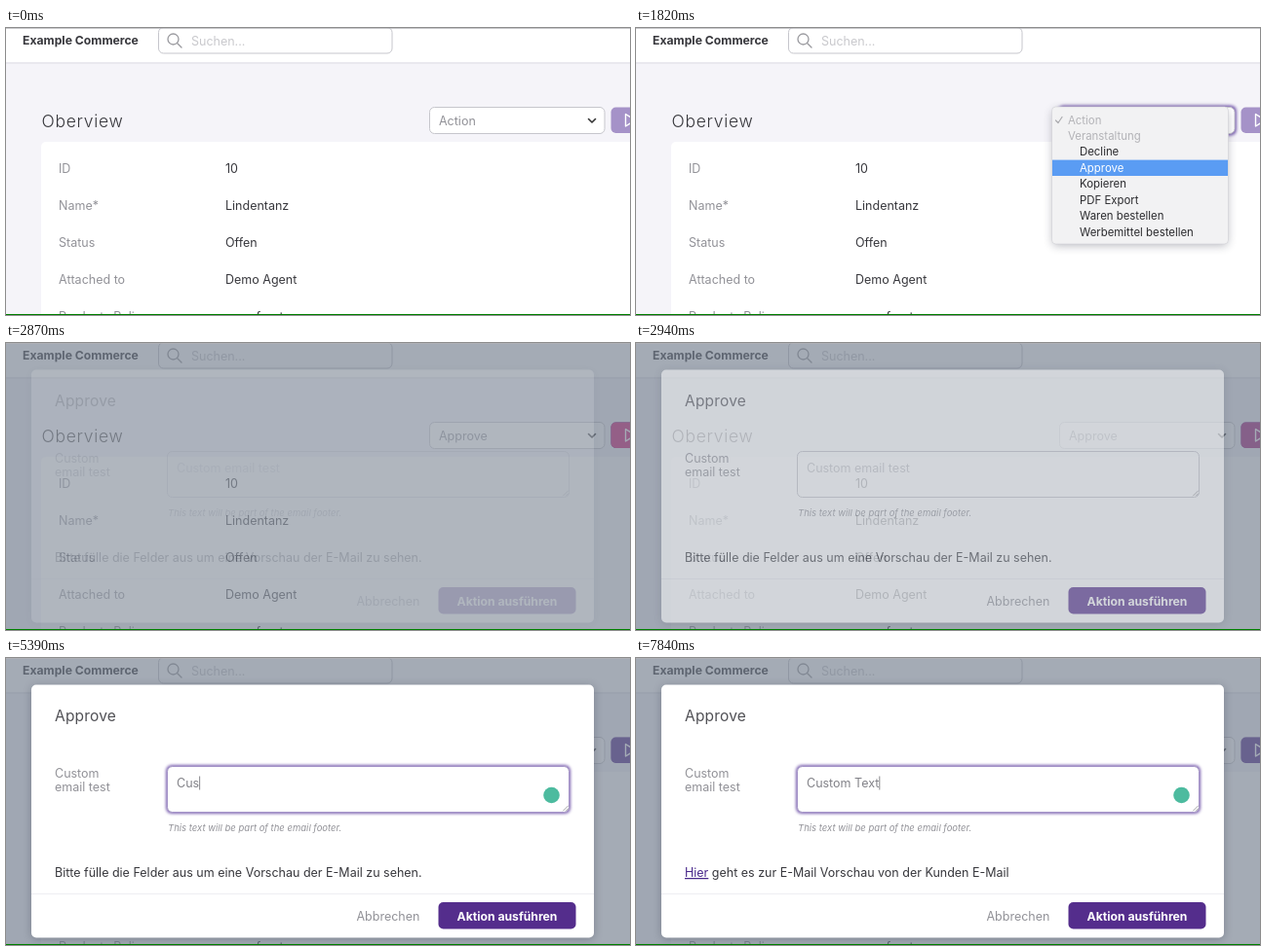
An HTML page for the animation above (8000 ms loop, 640x295 px).

```html
<!DOCTYPE html>
<html lang="de">
<head>
<meta charset="utf-8">
<style>
  html, body { margin: 0; width: 100%; height: 100%; overflow: hidden; background: #f5f4f9; }
  svg { display: block; width: 640px; height: 295px; }
  text { font: 12.5px Inter, sans-serif; fill: #38383d; white-space: pre; }
  .label { fill: #929298; }
  .bold { font-weight: 700; font-size: 12.2px; }
  .hint { fill: #c9c9cd; }
  .field { fill: #fff; stroke: #c6c6cc; }
  .line { fill: none; stroke-linecap: round; stroke-linejoin: round; }
  .glow { fill: #7c61b0; filter: blur(1.5px); }
  .shadow { fill: #23263a; filter: blur(5px); opacity: .3; }
  #menu text { font-size: 11.4px; }
</style>
</head>
<body>
<svg viewBox="0 0 640 295">
  <rect width="640" height="295" fill="#f5f4f9"/>
  <rect y="34" width="640" height="3" fill="#e9e8ee"/>
  <rect width="640" height="35" fill="#fff"/>
  <text class="bold" x="17" y="17">Example Commerce</text>
  <rect class="field" x="156.5" y="-.5" width="239.5" height="26.5" rx="5"/>
  <path class="line" stroke="#9a9a9f" stroke-width="1.3" d="M175.5 15.5l4.5 4.5M177 11.5a5.5 5.5 0 1 1-11 0a5.5 5.5 0 1 1 11 0"/>
  <text class="hint" x="190" y="17.5">Suchen...</text>

  <text x="36.5" y="101.5" style="font-size:17.5px;font-weight:300;letter-spacing:.7px">Oberview</text>
  <rect x="36" y="117" width="620" height="190" rx="5" fill="#fff"/>
  <g id="rows"></g>

  <rect class="glow" id="selectGlow" x="432.5" y="79.5" width="183.500" height="31" rx="6"/>
  <rect class="field" x="434.5" y="81.5" width="179.5" height="27" rx="5"/>
  <text class="label" id="selected" x="444" y="99.5"></text>
  <path class="line" stroke="#333" stroke-width="1.6" d="M597.5 93.5l3.5 3.5l3.5-3.5"/>

  <rect class="glow" id="goGlow" x="618.5" y="79.5" width="40" height="30.5" rx="6"/>
  <g>
    <rect x="620.5" y="81.5" width="40" height="26.5" rx="5" fill="#a592c8"/>
    <rect id="goReady" x="620.5" y="81.5" width="40" height="26.5" rx="5" fill="#542d91"/>
    <rect id="goHover" x="620.5" y="81.5" width="40" height="26.5" rx="5" fill="#d2247c"/>
    <path class="line" stroke="#fff" stroke-width="1.4" d="M635.5 88.5v12.5l10-6.25z"/>
  </g>

  <g id="menu">
    <rect class="shadow" x="427" y="84" width="180" height="140" rx="5"/>
    <rect x="426.5" y="81" width="181" height="141" rx="4" fill="#f2f2f3" stroke="#cfcfd3" stroke-width=".6"/>
    <rect id="bar" x="427" width="180" height="16.4" fill="#5a9cf3"/>
    <path class="line" stroke="#aaaaae" stroke-width="1.2" d="M430.5 95l2.5 2.5l4-6"/>
  </g>

  <rect id="backdrop" width="640" height="295" fill="#747e8e"/>

  <g id="dialog">
    <rect class="shadow" x="26" y="29" width="577" height="260" rx="5"/>
    <rect x="26" y="27.5" width="577" height="260" rx="5" fill="#fff"/>
    <text x="50" y="65" style="font-size:15.5px;letter-spacing:.2px;fill:#505055">Approve</text>
    <text class="label" x="50" y="122.5">Custom</text>
    <text class="label" x="50" y="137">email test</text>

    <rect class="glow" id="areaGlow" x="164" y="110" width="415" height="50" rx="6"/>
    <rect class="field" x="165.5" y="111.5" width="412" height="47" rx="5"/>
    <rect id="areaEdge" x="165.5" y="111.5" width="412" height="47" rx="5" fill="none" stroke="#a493c8"/>
    <path class="line" stroke="#8a8a8e" stroke-width=".8" d="M571.5 157l5-5M574.5 157l2-2"/>
    <text class="hint" id="placeholder" x="175" y="132.5">Custom email test</text>
    <text id="typed" x="175" y="132.5" style="fill:#828288"></text>
    <rect id="caret" y="121.5" width="1" height="14" fill="#88888c"/>
    <circle id="helper" cx="559.5" cy="141" r="8.3" fill="#4dbb9f"/>
    <text class="label" x="166" y="178" style="font-size:9.5px;font-style:italic">This text will be part of the email footer.</text>

    <text id="before" x="50" y="225">Bitte fülle die Felder aus um eine Vorschau der E-Mail zu sehen.</text>
    <text id="after" x="50" y="225"><tspan fill="#4a2a8c" text-decoration="underline">Hier</tspan> geht es zur E-Mail Vorschau von der Kunden E-Mail</text>

    <path d="M26 242.5h577" stroke="#eeeef2"/>
    <text class="label" x="359.5" y="269.5">Abbrechen</text>
    <rect class="glow" id="runGlow" x="442" y="249.5" width="144" height="31" rx="6"/>
    <rect x="443.5" y="251" width="141" height="27.5" rx="5" fill="#542d8c"/>
    <text class="bold" x="514" y="269.5" text-anchor="middle" style="fill:#fff">Aktion ausführen</text>
  </g>

  <rect width="640" height=".7" fill="#b4b4b8"/>
  <rect y="294" width="640" height="1" fill="#008000"/>
</svg>
<script>
const LOOP = 8000, STEP = 70;
const $ = id => document.getElementById(id);

function addText(parent, x, y, content, className = '') {
  const el = document.createElementNS($('menu').namespaceURI, 'text');
  el.setAttribute('x', x);
  el.setAttribute('y', y);
  el.setAttribute('class', className);
  el.textContent = content;
  return $(parent).appendChild(el);
}

[['ID', '10'], ['Name*', 'Lindentanz'], ['Status', 'Offen'],
 ['Attached to', 'Demo Agent'], ['Products Policy', 'uses front']].forEach(([label, value], i) => {
  addText('rows', 54, 149 + 38 * i, label, 'label');
  addText('rows', 225, 149 + 38 * i, value);
});

const itemY = i => 94.5 + 16.43 * i;
const items = ['Action', 'Veranstaltung', 'Decline', 'Approve', 'Kopieren', 'PDF Export',
  'Waren bestellen', 'Werbemittel bestellen']
  .map((name, i) => addText('menu', i < 2 ? 443 : 455, itemY(i) + 4.1, name));

const message = 'Custom Text';
const keyTimes = [4970, 5110, 5320, 5530, 5740, 5950, 6230, 6370, 6510, 6720, 6930];

const ramp = (t, from, to) => Math.min(1, Math.max(0, (t - from) / (to - from)));
const pulse = (t, a, b, c, d) => ramp(t, a, b) - ramp(t, c, d);
const show = (id, opacity) => $(id).setAttribute('opacity', opacity);

function render(t) {
  // Select, menu and start button
  show('menu', pulse(t, 490, 630, 1890, 2170));
  show('selectGlow', pulse(t, 490, 700, 2660, 2800));
  $('selected').textContent = t < 1960 ? 'Action' : 'Approve';
  const hovered = t < 1260 ? -1 : t < 1540 ? 2 : 3;
  show('bar', hovered < 0 ? 0 : 1);
  $('bar').setAttribute('y', itemY(hovered) - 8.2);
  items.forEach((el, i) => el.style.fill = i < 2 ? '#b3b3b7' : i === hovered ? '#fff' : '#2b2b2e');
  show('goReady', ramp(t, 1890, 2100));
  show('goHover', pulse(t, 2380, 2450, 2870, 3080));
  show('goGlow', pulse(t, 2660, 2800, 2800, 2870));

  // Dialog
  show('backdrop', .65 * ramp(t, 2805, 2870));
  show('dialog', 1 - (1 - ramp(t, 2850, 3150)) ** 2);
  show('runGlow', pulse(t, 3080, 3360, 4200, 4480));
  const focus = ramp(t, 4200, 4480);
  show('areaGlow', focus);
  show('areaEdge', focus);
  show('helper', ramp(t, 4690, 4900));

  // Typing
  const count = keyTimes.filter(time => time <= t).length;
  $('typed').textContent = message.slice(0, count);
  show('placeholder', count ? 0 : 1);
  show('caret', t >= 4270 ? 1 : 0);
  $('caret').setAttribute('x', 175 + (count ? $('typed').getComputedTextLength() : 0));
  const ready = t >= 7210;
  show('before', ready ? 0 : 1);
  show('after', ready ? 1 : 0);
}

function tick() {
  const t = performance.now() % LOOP;
  render(Math.floor(t / STEP) * STEP);
  requestAnimationFrame(tick);
}
tick();
</script>
</body>
</html>
```
